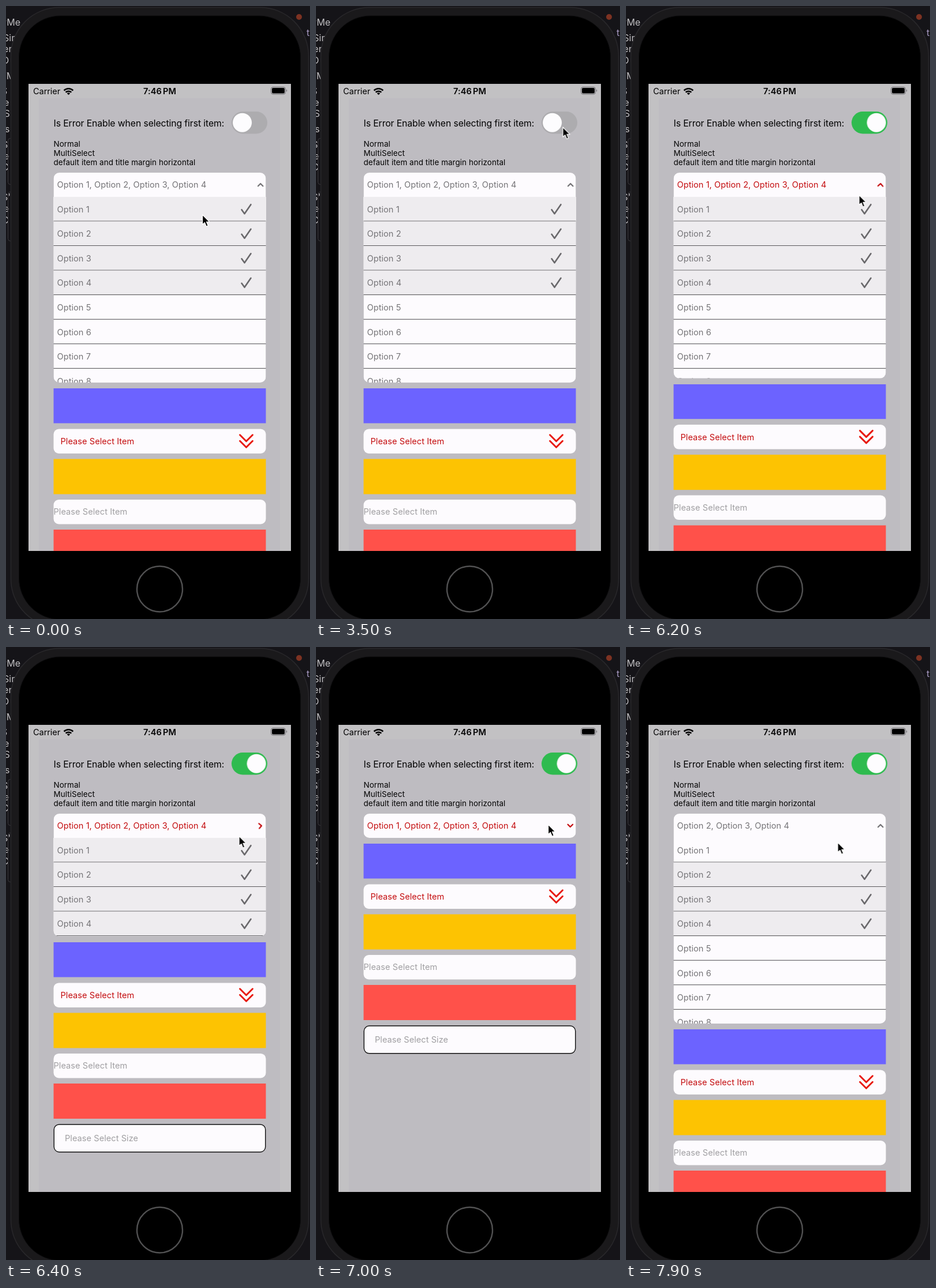
Write an HTML page that moves like this. It is 527 px wide and 1063 px high and loops after 8 s.

```html
<!DOCTYPE html>
<html lang="en">
<head>
<meta charset="utf-8">
<title>Drop-down demo</title>
<style>
html, body { margin: 0; width: 100%; height: 100%; overflow: hidden; background: #151418; }
.layer, svg { position: absolute; left: 0; top: 0; width: 527px; height: 1063px; }
.layer, svg { overflow: hidden; }
text { font: 14.56px Inter, "Open Sans", sans-serif; letter-spacing: .06px; white-space: pre; }
.code { font-size: 16px; fill: #c0bfc2; }
.head { font-size: 15.77px; letter-spacing: -.1px; }
.note { font-size: 13.4px; letter-spacing: .08px; }
.carrier { letter-spacing: -.08px; }
.clock { font-weight: 600; letter-spacing: .1px; word-spacing: -1.7px; }
.grey { fill: #757477; }
.hint { fill: #a09fa2; }
.alert { fill: #c40d0f; }
.line { fill: none; stroke-linecap: round; stroke-linejoin: round; }
.card { fill: #fdfbfe; }

.screen { clip-path: inset(135px 33px 118px 39px); }
.drop { clip-path: inset(289px 76.5px 410px 82.5px round 10px); }
.drop, .below, .arrow, .knob, .track, .tint, .before, .after, .cursor {
  animation: 8s linear infinite;
}
.drop { animation-name: fold; }
.below { animation-name: lift; }
.arrow { animation-name: turn; transform-origin: 441px 310px; }
.knob { animation-name: slide; }
.track { animation-name: fade; }
.tint { animation-name: tint; animation-timing-function: step-end; }
.before { animation-name: leave; animation-timing-function: step-end; }
.after { animation-name: enter; animation-timing-function: step-end; }
.cursor { animation-name: point; }
.drop, .below, .arrow, .knob, .cursor { animation-timing-function: ease-in-out; }

@keyframes fold {
  0%, 76.78%, 95.19%, 100% { clip-path: inset(289px 76.5px 410px 82.5px round 10px); }
  83.46%, 88.5% { clip-path: inset(289px 76.5px 732px 82.5px round 10px); }
}
@keyframes lift {
  0%, 76.78%, 95.19%, 100% { transform: translateY(0); }
  83.46%, 88.5% { transform: translateY(-322px); }
}
@keyframes turn {
  0%, 76.78%, 95.19%, 100% { transform: rotate(0deg); }
  83.46%, 88.5% { transform: rotate(180deg); }
}
@keyframes slide {
  0%, 16.875%, 39.75%, 55.625% { transform: translateX(0); }
  19.75%, 36.875%, 58.5%, 100% { transform: translateX(24.5px); }
}
@keyframes fade {
  0%, 16.875%, 41.625%, 55.625% { fill: #adacaf; }
  21.625%, 36.875%, 60.375%, 100% { fill: #2fbb4f; }
}
@keyframes tint {
  0%, 37.5%, 97.5%, 100% { color: #757477; }
  17.5%, 56.25% { color: #c40d0f; }
}
@keyframes leave { 0% { opacity: 1; } 97.5%, 100% { opacity: 0; } }
@keyframes enter { 0% { opacity: 0; } 97.5%, 100% { opacity: 1; } }
@keyframes point {
  0%, 3% { transform: translate(340px, 361px); }
  15.5%, 40% { transform: translate(427.5px, 209px); }
  55%, 71.25% { transform: translate(426.5px, 210px); }
  76%, 82.5% { transform: translate(403.5px, 327px); }
  87.5%, 89% { transform: translate(402px, 307px); }
  96%, 100% { transform: translate(366.5px, 338px); }
}
</style>
</head>
<body>
<svg viewBox="0 0 527 1063">
  <rect width="527" height="1063" fill="#151418"/>
  <g id="code"></g>
  <g fill="none" stroke="#3b3a3e">
    <rect x="3.5" y="229.5" width="40" height="80" rx="4"/>
    <rect x="3.5" y="322.5" width="40" height="85" rx="4"/>
  </g>
  <circle cx="508" cy="19" r="5" fill="#7d3222"/>
  <text class="code" x="521" y="52" style="fill:#a99bc4">t</text>
  <rect x="8.5" y="2.5" width="516" height="1075" rx="84" fill="#1a191b" stroke="#29282b" stroke-width="1.5"/>
  <rect x="22.5" y="17" width="488" height="1047" rx="72" fill="#000" stroke="#0c0c0d"/>
  <circle cx="266.5" cy="1011" r="39.5" fill="none" stroke="#515152" stroke-width="2.4"/>
  <rect x="39" y="135" width="455" height="810" fill="#c2c1c3"/>
  <rect x="57" y="160" width="418" height="785" fill="#bebcc1"/>

  <text class="carrier" x="47" y="152.5">Carrier</text>
  <text class="clock" x="238" y="152.5">7:46 PM</text>
  <path class="line" stroke="#000" stroke-width="2.5" style="stroke-linecap:butt"
    d="M100.5 146.5a11.3 11.3 0 0 1 15.8 0M103.5 149.7a7 7 0 0 1 9.8 0"/>
  <path d="M108.4 154.2l-2.7-2.7a3.9 3.9 0 0 1 5.4 0z"/>
  <rect x="459.5" y="140.5" width="25" height="12.5" rx="3.5" fill="none" stroke="#6d6c70"/>
  <rect x="461" y="142" width="22" height="9.5" rx="2"/>
  <path d="M486 144.5q2.4 2.2 0 4.5z" fill="#6d6c70"/>

  <text class="head" x="82.5" y="209">Is Error Enable when selecting first item:</text>
  <rect class="track" x="391" y="183" width="62" height="38.5" rx="19.25" fill="#adacaf"/>
  <circle class="knob" cx="409.6" cy="202.2" r="16.5" fill="#fdfcfe"/>
  <text class="note" x="82.5" y="243.7">Normal</text>
  <text class="note" x="82.5" y="259.6">MultiSelect</text>
  <text class="note" x="82.5" y="275.5">default item and title margin horizontal</text>
</svg>

<div class="layer screen">
  <svg viewBox="0 0 527 1063"><g class="below">
    <rect x="82.5" y="663" width="368" height="60.5" fill="#6c63ff"/>
    <rect class="card" x="82.5" y="733.5" width="368" height="42.5" rx="9"/>
    <text class="alert" x="94.5" y="760">Please Select Item</text>
    <path class="line" stroke="#e81a10" stroke-width="3"
      d="M405.5 743.8l11 11 11-11M405.5 754.3l11 11 11-11"/>
    <rect x="82.5" y="785.5" width="368" height="61" fill="#fdc302"/>
    <rect class="card" x="82.5" y="856" width="368" height="42.5" rx="9"/>
    <text class="hint" x="82.5" y="882.2">Please Select Item</text>
    <rect x="82.5" y="908" width="368" height="61" fill="#ff514a"/>
    <rect class="card" x="83.25" y="979" width="366.5" height="47.8" rx="9" stroke="#111" stroke-width="1.4"/>
    <text class="hint" x="102" y="1008">Please Select Size</text>
  </g></svg>
  <div class="layer drop"><svg viewBox="0 0 527 1063">
    <rect class="card" x="82" y="289" width="369" height="370"/>
    <g id="rows"></g>
    <g class="tint">
      <text class="before" x="88.5" y="315" fill="currentColor">Option 1, Option 2, Option 3, Option 4</text>
      <text class="after" x="88.5" y="315" fill="currentColor">Option 2, Option 3, Option 4</text>
      <path class="line arrow" stroke="currentColor" stroke-width="2.3" d="M437 312.3l4.2-4.3 4.2 4.3"/>
    </g>
  </svg></div>
</div>

<svg viewBox="0 0 527 1063">
  <path class="cursor" d="M.6 1v17l3.9-3.5 2.8 6.700 3-1.300-2.800-6.600h5.300z"
    fill="#000" stroke="#fff" stroke-width="1.2" stroke-linejoin="round"/>
</svg>

<script>
const LOOP = 8000, STEP = 100, ROW = 42.55;
const get = id => document.getElementById(id);

// Sliver of the editor behind the phone: text, x, baseline
get("code").innerHTML = [
  ["yMe", -8, 34], ["Sir", -5, 61], ["er", -5, 80], ["O", -7, 100], ["/M", -5, 127],
  ["S", -8, 153], ["e", -4, 173], ["DS", -15, 192], ["s", -2, 219],
  ["S", -7, 246], ["e", -4, 266], ["C", -7, 285], ["S'", -7, 337], ["e", -4, 357], ["C", -7, 377]
].map(([s, x, y]) => `<text class="code" x="${x}" y="${y}">${s}</text>`).join("");

const row = n => {
  const y = 331 + (n - 1) * ROW;
  const picked = n > 4 ? "" : `<g class="${n === 1 ? "before" : ""}">
    <rect x="82" y="${y}" width="369" height="${ROW}" fill="#eeecef"/>
    <path class="line" stroke="#69686b" stroke-width="2.6" d="M408.5 ${y + 22.2}l5 7 11-16"/></g>`;
  return `${picked}<text class="grey" x="88.5" y="${y + 26.8}">Option ${n}</text>
    <rect x="82" y="${y + ROW - 1}" width="369" height="1" fill="#4b4a4d"/>`;
};
get("rows").innerHTML = [1, 2, 3, 4, 5, 6, 7, 8].map(row).join("");

const moves = document.getAnimations();
moves.forEach(m => m.pause());
function draw() {
  const t = Math.floor((performance.now() + 20) / STEP) * STEP % LOOP;
  moves.forEach(m => { m.currentTime = t; });
  requestAnimationFrame(draw);
}
draw();
</script>
</body>
</html>
```
